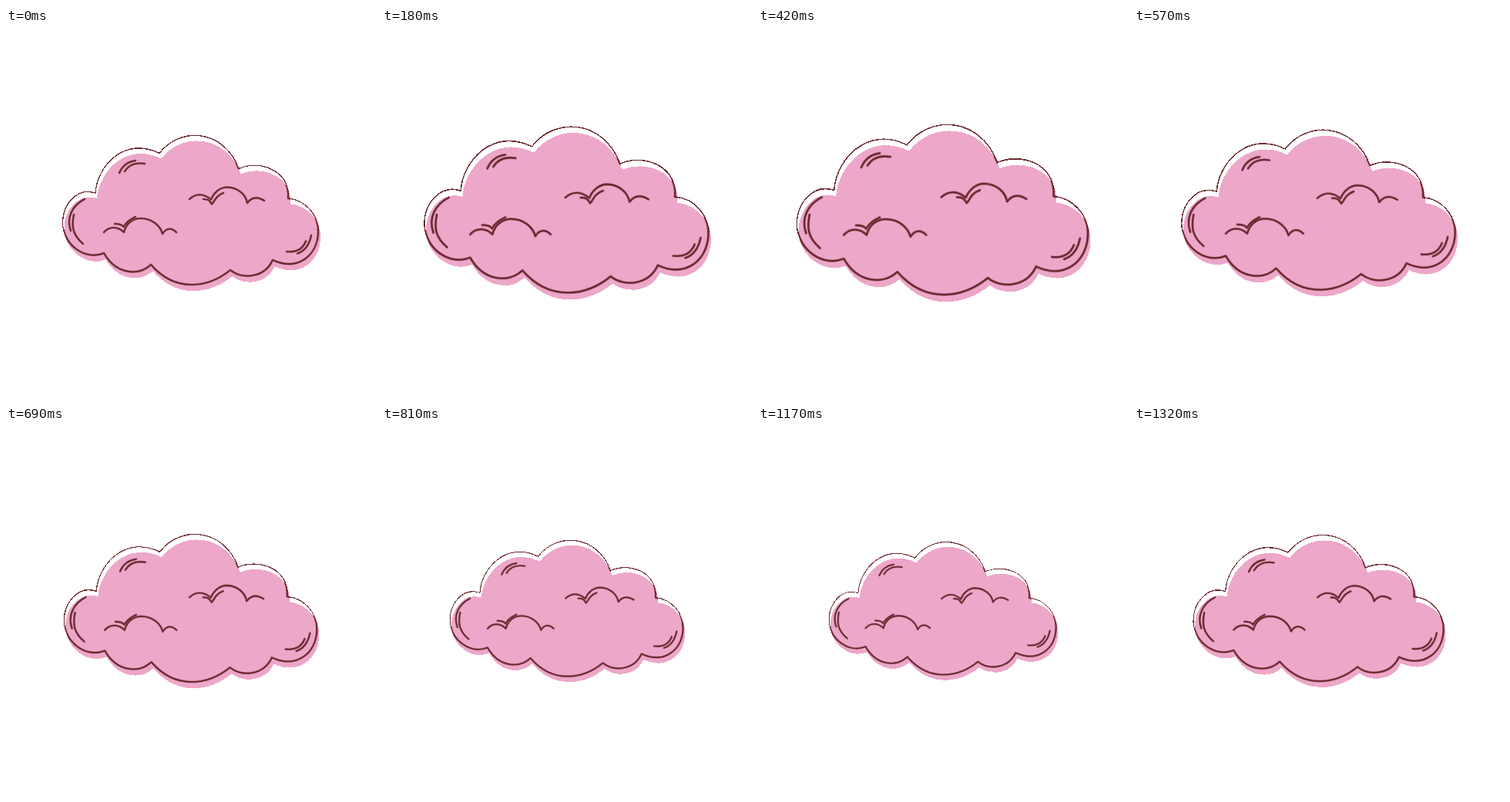
Write an HTML page with a canvas that moves like this. It is 480 by 480 pixels and loops after 1.35 s.

```html
<!DOCTYPE html>
<html lang="en">
<head>
<meta charset="utf-8">
<title>Pulsing cloud</title>
<style>
  html, body { margin: 0; width: 100%; height: 100%; overflow: hidden; background: #fff; }
  canvas { display: block; width: 480px; height: 480px; }
</style>
</head>
<body>
<canvas id="stage" width="480" height="480"></canvas>
<script>
const SIZE = 480, CENTER = SIZE / 2;
const LOOP = 1350, STEP = 30;
const PINK = '#eda7c9', LINE = '#6c2930';
const LINE_WIDTH = 2.1, SOFT_WIDTH = 3.2;
const MIN_ALPHA = 242; // fainter edge pixels vanish, leaving crisp, thin outer lines

const ctx = document.getElementById('stage').getContext('2d', { willReadFrequently: true });

const outline = new Path2D(`M116,214
  C118,179 154,140 199,162.5
  C225,128 282,130 302,182.5
  C327,171 369,183 366,221
  C388,223 406,242 405,265
  C404,295 379,316 346,301
  C335,325 306,326 291,314
  C264,336 221,345 188,307
  C172,322 143,320 127,292
  C103,302 75,282 73.5,254
  C73,230 91,206 116,214 Z`);

const details = new Path2D([
  // shine marks
  'M102,222 C86,230 78,246 84,263',
  'M88,242 C85,257 86,268 100,280',
  'M147,188 Q153,174 168,172',
  'M154,186 Q162,173 180,176',
  'M364,290 Q383,292 389,276.5',
  'M378,292.5 Q392,288 396,269',
  // inner puffs
  'M238,222 C247,214 257,215 266,222.5 C270,213 278,206.5 287,206.5 C301,207 311,216 313,227 C319,219 327,219 335,224',
  'M256,222 C263,222 264,224 267,228.5 C271,225 271,218 282,214',
  'M127,265 C134,257 145,257 153,265 C156,253 165,247 175,247 C189,247 200,256 203,267 C208,259 215,259 221,265',
  'M141,254 Q150,254 152.5,258 Q157,250 168,245'
].join(' '));

function strokeLines(width, alpha, blend) {
  ctx.lineWidth = width;
  ctx.globalAlpha = alpha;
  ctx.globalCompositeOperation = blend;
  ctx.stroke(outline);
  ctx.stroke(details);
}

function drawCloud(scale) {
  ctx.clearRect(0, 0, SIZE, SIZE);
  ctx.save();
  ctx.translate(CENTER, CENTER);
  ctx.scale(scale, scale);
  ctx.translate(-CENTER, -CENTER);
  ctx.lineCap = ctx.lineJoin = 'round';

  ctx.save();
  ctx.translate(2.5, 7.6);
  ctx.fillStyle = ctx.strokeStyle = PINK;
  ctx.lineWidth = 1.8;
  ctx.fill(outline);
  ctx.stroke(outline);
  ctx.restore();

  ctx.strokeStyle = LINE;
  strokeLines(SOFT_WIDTH, 0.35, 'source-atop'); // soft edge on the pink only
  strokeLines(LINE_WIDTH, 1, 'source-over');
  ctx.restore();
}

function hardenEdges() {
  const image = ctx.getImageData(0, 0, SIZE, SIZE);
  const px = image.data;
  for (let i = 3; i < px.length; i += 4) px[i] = px[i] < MIN_ALPHA ? 0 : 255;
  ctx.putImageData(image, 0, 0);
}

const start = performance.now();
let shown = -1;

function frame(now) {
  const step = Math.floor((Math.max(0, now - start) % LOOP) / STEP);
  if (step !== shown) {
    shown = step;
    drawCloud(1 + 0.15 * Math.sin(2 * Math.PI * step * STEP / LOOP));
    hardenEdges();
  }
  requestAnimationFrame(frame);
}
frame(start);
</script>
</body>
</html>
```
